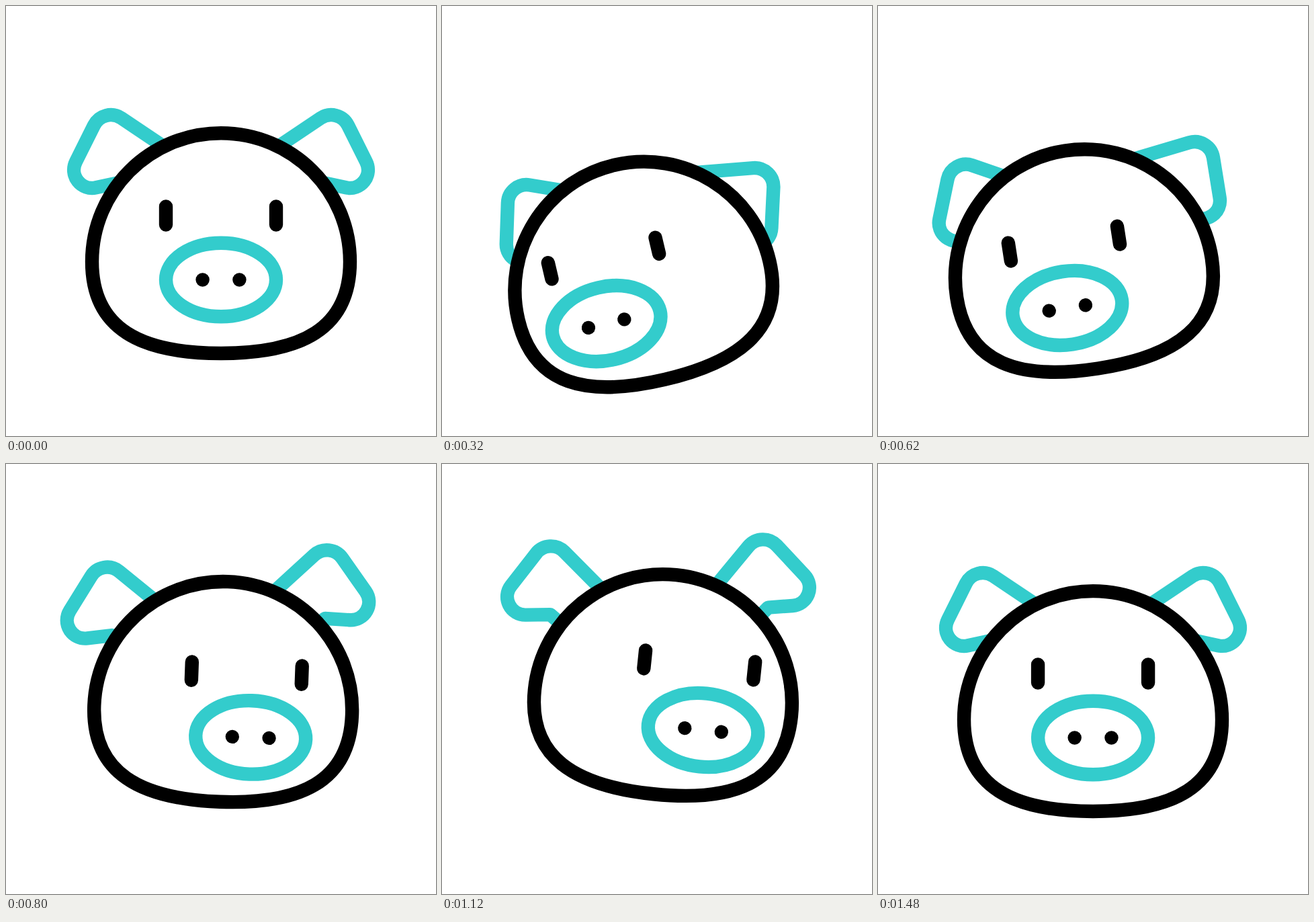
Recreate the animation shown at these times as an HTML page. Size 640x640 px, loop 2400 ms.

```html
<!DOCTYPE html>
<html lang="en">
<head>
<meta charset="utf-8">
<title>Pig</title>
<style>
  html, body { margin: 0; width: 100%; height: 100%; overflow: hidden; background: #fff; }
  svg { display: block; width: 100vw; height: 100vh; }
  svg * { stroke-width: 20.4; stroke-linecap: round; stroke-linejoin: round; }
  .teal { stroke: #3cc; fill: none; }
  .ink { stroke: #000; fill: #fff; }
  .dot { stroke: none; fill: #000; }
</style>
</head>
<body>
<svg viewBox="0 0 640 640">
  <defs>
    <path id="ear" d="M57-152.5 148.3-213.7A28 28 0 0 1 189-203L216-148.8A27 27 0 0 1 186-110.3L150.5-118 120-101"/>
  </defs>
  <!-- origin: centre of the round upper half of the head -->
  <g id="head">
    <g id="earL" class="teal"><use href="#ear" transform="scale(-1 1)"/></g>
    <g id="earR" class="teal"><use href="#ear"/></g>
    <path class="ink" d="M-192 0C-192-105.8-106-191.4 0-191.4S192-105.8 192 0C192 101 118 136.4 0 136.4S-192 101-192 0Z"/>
    <path id="eyes" class="ink"/>
    <g id="nose">
      <ellipse class="teal" rx="82" ry="54.7"/>
      <circle class="dot" cx="-27.4" r="10.2"/>
      <circle class="dot" cx="27.4" r="10.2"/>
    </g>
  </g>
</svg>
<script>
const LOOP = 2400, START = 5, LEFT = 420, RIGHT = 970, END = 1490;
const PIVOT = 86; // the head tilts about a point this far below its origin

// Each channel: value when looking left, value when looking right,
// bow on the way to the left, bow on the way to the right.
const pose = {
  tilt:  [-15.4, 7.46, 0, -0.3],
  drop:  [47, -32, 0, 0],
  eyeX:  [-55.4, 60.6, 0, -2],
  noseX: [-76.5, 79.8, 0, -3],
  faceY: [11, 8.9, -1.7, 3.8],
  turnL: [-13.2, 6.9, 0, 1.2],
  earLX: [43.7, -39.3, 0, 1],
  earLY: [7, 15.4, -1.8, 5.3],
  turnR: [49.6, -28.2, 0, 0],
  earRX: [54, -28.2, -1.9, -3],
  earRY: [5, -1.1, -3.6, -9.5]
};

const el = id => document.getElementById(id);
const [head, earL, earR, eyes, nose] = ['head', 'earL', 'earR', 'eyes', 'nose'].map(el);
const place = (node, transform) => node.setAttribute('transform', transform);

function ease(t, from, to) {
  const u = Math.min(1, Math.max(0, (t - from) / (to - from)));
  return u * u * (3 - 2 * u);
}

function valueAt(t, [left, right, bowL, bowR]) {
  const a = ease(t, START, LEFT), b = ease(t, LEFT, RIGHT), c = ease(t, RIGHT, END);
  const base = t < LEFT ? left * a : t < RIGHT ? left + (right - left) * b : right * (1 - c);
  return base + 4 * (bowL * a * (1 - a) + bowR * b * (1 - b));
}

function eyeHalf(t) {
  const d = Math.abs(t - 200) / 170;
  return 13.6 * (d < 1 ? 1 - 0.45 * Math.cos(d * Math.PI / 2) ** 2 : 1);
}

function placeEar(node, x, y, turn, px, py) {
  place(node, `translate(${x} ${y}) rotate(${turn} ${px} ${py})`);
}

function draw(t) {
  const v = {};
  for (const k in pose) v[k] = valueAt(t, pose[k]);
  place(head, `translate(320 ${380.6 + v.drop}) rotate(${v.tilt} 0 ${PIVOT})`);
  placeEar(earL, v.earLX, v.earLY, v.turnL, -70, -110);
  placeEar(earR, v.earRX, v.earRY, v.turnR, 60, -170);
  const h = eyeHalf(t);
  eyes.setAttribute('d', `M-82 ${-h}V${h}M82 ${-h}V${h}`);
  place(eyes, `translate(${v.eyeX} ${v.faceY - 68.6})`);
  place(nose, `translate(${v.noseX} ${v.faceY + 26.9})`);
}

function tick() {
  draw(performance.now() % LOOP);
  requestAnimationFrame(tick);
}
tick();
</script>
</body>
</html>
```
